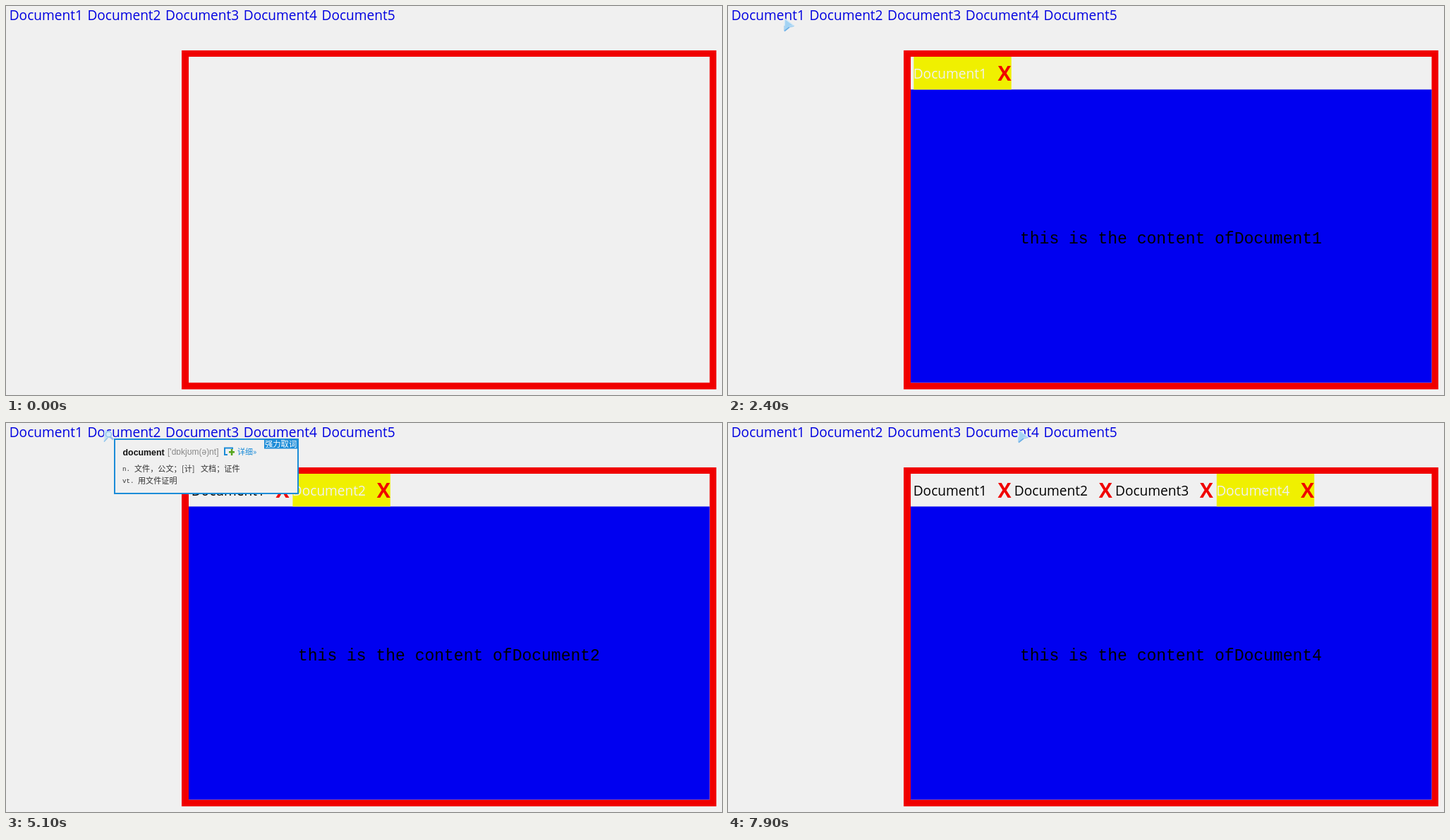
An HTML page with a canvas for the animation above (8000 ms loop, 1015 by 552 pixels).

```html
<!DOCTYPE html>
<html lang="en">
<head>
<meta charset="utf-8">
<title>Document tabs</title>
<style>
  html, body { margin: 0; width: 100%; height: 100%; overflow: hidden; background: #f0f0f0; }
  canvas { display: block; }
</style>
</head>
<body>
<canvas id="stage" width="1015" height="552"></canvas>
<script>
const ctx = document.getElementById('stage').getContext('2d');
const LOOP = 8000, STEP = 100;
const PAPER = '#f0f0f0', RED = '#f00000', BLUE = '#0000f0', YELLOW = '#f0f000', ACCENT = '#1c8cd8';
const UI = '"Open Sans", "Noto Sans", sans-serif';
const ARIAL = '"Liberation Sans", Arial, sans-serif';
const MONO = '"Liberation Mono", monospace';
const CJK = '"Noto Sans CJK SC", "Noto Sans CJK JP", "Noto Sans CJK", sans-serif';

const OPENED = [2400, 5100, 6700, 7900];
const PRESSED = [[2200, 2400], [5000, 5100]];
const POPUP = [4200, 5600];

// time, x, y, look, and optionally a glide length from the previous point
const CURSOR = [
  [100, 944, 98, 'arrow'],
  [600, 905, 94, 'arrow'], [700, 745, 82, 'arrow'], [800, 480, 69, 'arrow'],
  [900, 300, 62, 'arrow'], [1000, 232, 65, 'arrow'],
  [1200, 80, 20, 'arrow', 900], [2100, 79, 17, 'arrow'],
  [3100, 190, 45, 'arrow'], [3200, 342, 91, 'arrow'], [3300, 270, 58, 'arrow'],
  [3400, 165, 17, 'arrow'], [3500, 138, 8, 'arrow'], [3700, 138, 8, 'lens'],
  [5300, 151, 5, 'lens'],
  [5600, 330, 87, 'arrow'], [5700, 350, 8, 'lens'], [5800, 377, 1, 'lens'],
  [6100, 350, 84, 'arrow'], [6200, 227, 5, 'arrow'],
  [6700, 326, 9, 'arrow'],
  [7200, 440, 52, 'arrow'], [7300, 523, 84, 'arrow'], [7400, 230, 40, 'arrow'],
  [7500, 94, 4, 'arrow'], [7600, 313, 6, 'arrow'],
  [7900, 411, 9, 'arrow']
];

const within = (t, [from, to]) => t >= from && t < to;

function rect(x, y, w, h, color) {
  ctx.fillStyle = color;
  ctx.fillRect(x, y, w, h);
}

function text(str, x, y, font, color) {
  ctx.font = font;
  ctx.fillStyle = color;
  ctx.fillText(str, x, y);
}

function polygon(points, fill, stroke, width) {
  ctx.beginPath();
  points.forEach(([x, y]) => ctx.lineTo(x, y));
  ctx.closePath();
  ctx.fillStyle = fill;
  ctx.fill();
  ctx.strokeStyle = stroke;
  ctx.lineWidth = width;
  ctx.stroke();
}

function line(x1, y1, x2, y2, color, width) {
  ctx.beginPath();
  ctx.moveTo(x1, y1);
  ctx.lineTo(x2, y2);
  ctx.strokeStyle = color;
  ctx.lineWidth = width;
  ctx.stroke();
}

function drawLinks(t) {
  const pressed = PRESSED.findIndex(span => within(t, span));
  for (let i = 0; i < 5; i++) {
    text('Document' + (i + 1), 4.7 + i * 110.7, 20, '19.1px ' + UI, i === pressed ? RED : '#0000e0');
  }
}

function drawPanel(t) {
  rect(249, 63, 758, 481, RED);
  rect(259, 72, 738.5, 462.5, PAPER);
  const count = OPENED.filter(at => t >= at).length;
  if (!count) return;

  rect(259, 118.5, 738.5, 416, BLUE);
  for (let i = 0; i < count; i++) {
    const x = 263.3 + i * 143.15, active = i === count - 1;
    if (active) rect(x, 72, 138.4, 46.5, YELLOW);
    text('Document' + (i + 1), x - 0.6, 103, '19.1px ' + UI, active ? PAPER : '#000');
    text('X', x + 119.2, 106.3, 'bold 28.5px ' + UI, RED);
  }
  text('this is the content ofDocument' + count, 414, 336.5, '23px ' + MONO, '#000');
}

function drawPopup() {
  rect(153, 22, 262, 79, ACCENT);
  rect(155, 24, 258, 75, PAPER);
  rect(366, 23, 48, 13.5, ACCENT);
  text('强力取词', 367, 34, '11.3px ' + CJK, '#fff');
  text('document', 165.5, 45.5, 'bold 12.4px ' + ARIAL, '#111');
  text("['dɒkjʊm(ə)nt]", 229, 45, '12px ' + ARIAL, '#888');

  // word list icon with a plus
  ctx.strokeStyle = ACCENT;
  ctx.lineWidth = 2;
  ctx.strokeRect(310, 35.5, 11, 9.5);
  rect(314, 43, 4, 3, PAPER);
  rect(315, 37, 9, 9, PAPER);
  rect(316, 40, 8, 2.5, '#55a51c');
  rect(318.8, 37, 2.5, 9, '#55a51c');

  text('详细»', 328, 44.5, '11px ' + CJK, ACCENT);
  const small = '11.1px ' + CJK, latin = '9.2px ' + MONO, ink = '#333';
  text('n.', 165, 68, latin, ink);
  text('文件，公文；', 182, 69, small, ink);
  text('[计]', 249, 69, small, ink);
  text('文档；证件', 276, 69, small, ink);
  text('vt.', 165, 85, latin, ink);
  text('用文件证明', 187, 86, small, ink);
}

function cursorAt(t) {
  const i = CURSOR.findLastIndex(key => t >= key[0]);
  if (i < 0) return null;
  const [start, x, y, look, glide] = CURSOR[i];
  if (!glide) return { x, y, look };
  const p = Math.min(1, (t - start + STEP) / glide);
  const rest = (1 - p) ** 1.5;
  const [, fromX, fromY] = CURSOR[i - 1];
  return { x: x + (fromX - x) * rest, y: y + (fromY - y) * rest, look };
}

function drawCursor({ x, y, look }) {
  ctx.save();
  ctx.translate(x, y);
  ctx.lineJoin = 'round';
  if (look === 'arrow') {
    polygon([[1.5, 1], [14.5, 11], [8, 12.5], [1, 18.5]], '#a3d3f3', '#d3e8f8', 1.5);
    line(1, 18.5, 8, 13, '#69aee6', 1.6);
    line(8, 13, 14.5, 11.5, '#8dc3ec', 1.2);
    line(1, 11, 1, 18, '#8dc3ec', 1);
  } else {
    polygon([[1.5, 1], [10, 7], [7, 12], [1, 18.5]], '#c6e1f6', '#dcecf8', 1);
    line(1, 18.5, 6, 13, '#8dc3ec', 1.4);
    line(9, 11, 14, 15.5, '#9abfe8', 2.5);
    ctx.beginPath();
    ctx.arc(7.5, 8, 4, 0, Math.PI * 2);
    ctx.fillStyle = '#d4ecfb';
    ctx.fill();
    ctx.strokeStyle = '#8fc1ec';
    ctx.lineWidth = 1.4;
    ctx.stroke();
  }
  ctx.restore();
}

function render() {
  const t = Math.floor(performance.now() % LOOP / STEP) * STEP;
  rect(0, 0, 1015, 552, PAPER);
  drawLinks(t);
  drawPanel(t);
  if (within(t, POPUP)) drawPopup();
  const cursor = cursorAt(t);
  if (cursor) drawCursor(cursor);
  requestAnimationFrame(render);
}
render();
</script>
</body>
</html>
```
